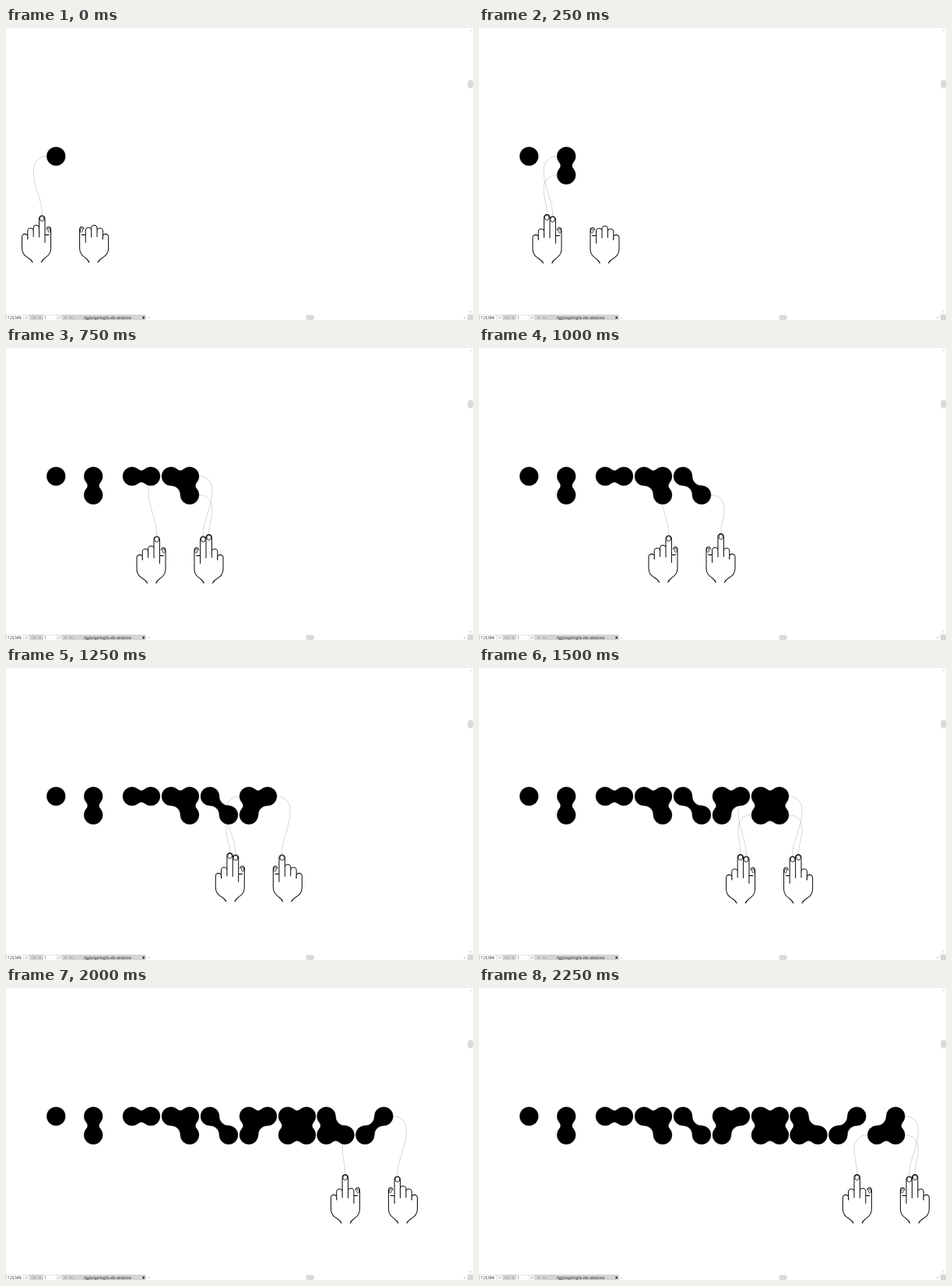
An HTML page that plays this animation: 600 px wide and 375 px high, repeating every 2500 ms.

```html
<!DOCTYPE html>
<html lang="it">
<head>
<meta charset="utf-8">
<title>Braille digits</title>
<style>
  html, body { margin: 0; width: 100%; height: 100%; overflow: hidden; background: #fff; }
  svg { display: block; width: 100vw; height: 100vh; }
  .thread { fill: none; stroke: #777; stroke-width: .55; stroke-dasharray: 1.1 .9; }
  .hand { fill: none; stroke: #111; stroke-width: 1.05; stroke-linecap: round; stroke-linejoin: round; }
  .digit { fill: #000; stroke: #000; stroke-width: .3; }
  .chev { fill: none; stroke: #777; stroke-width: .6; }
  text { font: 4.45px "Open Sans", "Noto Sans", sans-serif; fill: #222; }
</style>
</head>
<body>
<svg viewBox="0 0 600 375" preserveAspectRatio="none">
  <g id="threads"></g>
  <g id="digits" class="digit"></g>
  <g id="hands" class="hand"></g>
  <g id="bars">
    <rect x="0" y="368" width="180" height="7" fill="#d4d4d4"/>
    <rect x="1" y="368.6" width="21.5" height="6.4" fill="#fff"/>
    <rect x="23" y="368.6" width="7" height="6.4" fill="#f4f4f4"/>
    <rect x="48" y="368.6" width="16.5" height="6.4" fill="#fff"/>
    <rect x="65" y="368.6" width="6.5" height="6.4" fill="#f4f4f4"/>
    <text x="2.6" y="373.6">123,56%</text>
    <text x="49.2" y="373.6">1</text>
    <text x="100" y="373.6">Aggiunge/toglie alla selezione</text>
    <path class="chev" d="M24.8 371.2l1.5 1.5l1.5-1.5M66.6 371.2l1.5 1.5l1.5-1.5"/>
    <path fill="#a8a8a8" d="M33.4 370.2h.7v3.6h-.7zM37.6 370.2v3.6l-3-1.8zM44.6 370.2v3.6l-3-1.8zM75.6 370.2v3.6l3-1.8zM82.4 370.2v3.6l3-1.8zM85.6 370.2h.7v3.6h-.7z"/>
    <path fill="#222" d="M175.6 369.9v4.2l3-2.1z"/>
    <path class="chev" stroke-opacity=".7" d="M184 370.5l-1.3 1.5l1.3 1.5M588.6 370.5l1.3 1.5l-1.3 1.5M595.2 4l1.5-1.3l1.5 1.3M595.2 363.6l1.5 1.3l1.5-1.3"/>
    <rect x="385.3" y="368.6" width="10.6" height="6.4" rx="3" fill="#dadada"/>
    <rect x="593.4" y="67" width="6.6" height="10.6" rx="3" fill="#dadada"/>
    <rect x="593" y="368" width="7" height="7" fill="#d6d6d6"/>
  </g>
</svg>
<script>
const STEP = 250, R = 12, GAP = 24, TOP = 164.8, SPAN = 111;

// dots, digit x, hands x, hands y offset
const steps = [
  ["1", 64.3, 20.6, 0],
  ["12", 112.2, 69, 1],
  ["14", 162, 118.5, 1],
  ["145", 212, 168, 1],
  ["15", 262, 218, 0],
  ["124", 312, 269.3, -1],
  ["1245", 362, 317.6, 1],
  ["125", 411.5, 367, 0],
  ["24", 461.3, 417.5, 1],
  ["245", 511.2, 467.4, 1]
];

const INDEX = 25.7, MIDDLE = 18.3, TIP = { index: 241, middle: 238.6 };
// column, row
const cell = { 1: [0, 0], 2: [0, 1], 4: [1, 0], 5: [1, 1] };

function add(parent, tag, attrs) {
  const el = document.createElementNS("http://www.w3.org/2000/svg", tag);
  for (const k in attrs) el.setAttribute(k, attrs[k]);
  return parent.appendChild(el);
}

// Concave bridge between two equal circles
function neck(a, b, r) {
  const dx = b[0] - a[0], dy = b[1] - a[1], d = Math.hypot(dx, dy);
  const u = [dx / d, dy / d], k = R / (R + r);
  const along = d / 2 * k, off = Math.sqrt((R + r) ** 2 - d * d / 4) * k;
  const at = (p, s, side) =>
    `${p[0] + u[0] * along * s - u[1] * off * side} ${p[1] + u[1] * along * s + u[0] * off * side}`;
  const arc = sweep => `A${r} ${r} 0 0 ${sweep} `;
  return `M${at(a, 1, -1)}${arc(0)}${at(b, -1, -1)}L${at(b, -1, 1)}${arc(0)}${at(a, 1, 1)}Z`;
}

function drawDigit(g, dots, x) {
  const pts = [...dots].map(n => [x + cell[n][0] * GAP, TOP + cell[n][1] * GAP]);
  pts.forEach((p, i) => {
    add(g, "circle", { cx: p[0], cy: p[1], r: R });
    for (const q of pts.slice(i + 1)) {
      const diagonal = p[0] !== q[0] && p[1] !== q[1];
      add(g, "path", { d: neck(p, q, diagonal ? R : 6) });
    }
  });
}

function finger(x, top, leftEnd, rightEnd) {
  const w = 7.4, r = w / 2;
  return `M${x} ${leftEnd}V${top + r}A${r} ${r} 0 0 1 ${x + w} ${top + r}V${rightEnd}`;
}

function drawHand(g, transform, index, middle) {
  const h = add(g, "g", { transform });
  const d = [
    finger(0, 264.6, 283, 271),
    finger(7.2, 257, 271, 268),
    finger(14.6, middle ? TIP.middle : 253.3, 268, 268.5),
    finger(22, index ? TIP.index : 256.3, 268.5, 275.5),
    "M31.6 258.4C32 254.6 37 254.4 37 259V283",
    "M29.4 265.6H34.4",
    "M0 283C0 290 4 292.8 8 295.2C11 297 12.6 298.4 13.5 301",
    "M37 283C37 290 33 292.8 29.6 295.2C27 297 25.6 298.4 24.8 301"
  ];
  add(h, "path", { d: d.join("") });
  add(h, "ellipse", { cx: 34.9, cy: 259.7, rx: 1.6, ry: 2.6, "stroke-width": .8 });
  const nail = (cx, tip) =>
    add(h, "ellipse", { cx, cy: tip + 3.8, rx: 2.9, ry: 3.3, "stroke-width": .9 });
  if (index) nail(INDEX, TIP.index);
  if (middle) nail(MIDDLE, TIP.middle);
}

function drawThread(g, dot, x, hx, hy) {
  const [col, row] = cell[dot], dir = col ? 1 : -1;
  const sx = x + col * GAP + dir * R, sy = TOP + row * GAP;
  const bx = sx + dir * 17, by = sy + 18;
  const reach = row ? MIDDLE : INDEX;
  const fx = col ? hx + SPAN - reach : hx + reach;
  const fy = (row ? TIP.middle : TIP.index) + hy, k = (fy - by) * .4;
  add(g, "path", {
    class: "thread",
    d: `M${sx} ${sy}C${sx + dir * 10} ${sy} ${bx} ${sy + 7} ${bx} ${by}` +
       `C${bx} ${by + k} ${fx} ${fy - k} ${fx} ${fy}`
  });
}

const layer = id => add(document.getElementById(id), "g", {});
const scenes = steps.map(([dots, x, hx, hy]) => {
  const threads = layer("threads"), digit = layer("digits"), hands = layer("hands");
  const has = n => dots.includes(n);
  for (const n of dots) drawThread(threads, n, x, hx, hy);
  drawDigit(digit, dots, x);
  drawHand(hands, `translate(${hx} ${hy})`, has("1"), has("2"));
  drawHand(hands, `translate(${hx + SPAN} ${hy}) scale(-1 1)`, has("4"), has("5"));
  return { threads, digit, hands };
});

const show = (el, on) => el.setAttribute("visibility", on ? "visible" : "hidden");

function render(t) {
  const now = Math.floor(Math.max(t, 0) / STEP) % steps.length;
  scenes.forEach((s, i) => {
    show(s.threads, i === now);
    show(s.hands, i === now);
    show(s.digit, i <= now);
  });
}

const start = performance.now();
function tick() {
  render(performance.now() - start);
  requestAnimationFrame(tick);
}
tick();
</script>
</body>
</html>
```
